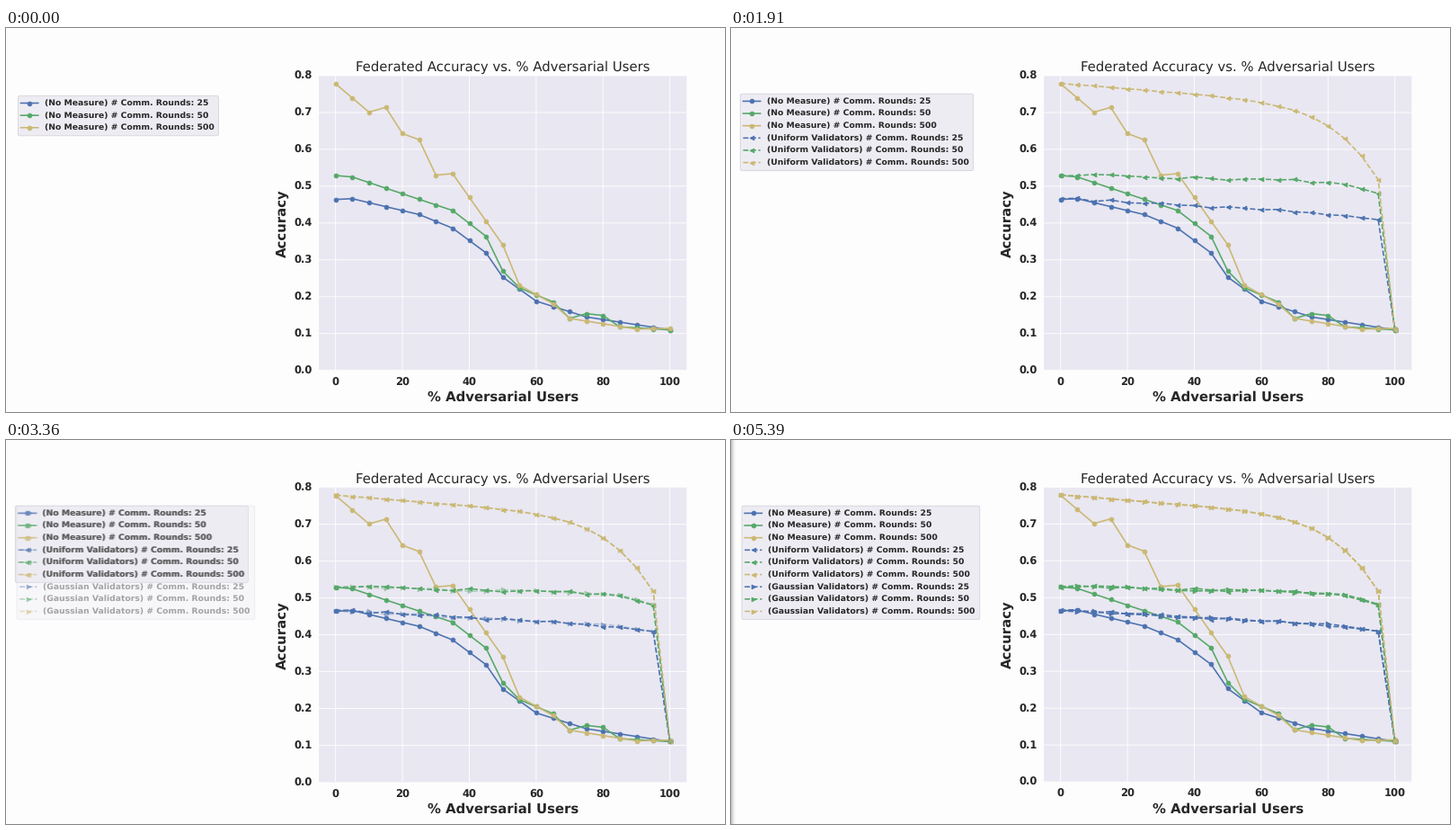
Animation of 800x427 px, one loop 5450 ms. Source, as a matplotlib script:

```python
import numpy as np
import matplotlib.pyplot as plt
from matplotlib.animation import FuncAnimation
from matplotlib.lines import Line2D
from matplotlib.patches import FancyBboxPatch, Rectangle

plt.rcParams["text.hinting"] = "none"
plt.rcParams["path.snap"] = False

W, H, DPI = 800, 427, 64
PT = 72 / DPI  # points per pixel
LOOP_MS, STEP_MS = 5450, 25
FADE_MS = 610
EDGE_SHADOW_MS = 5325
DRIFT = 0.6  # pixels the chart rises during the last fade

PAGE, PANEL, INK = "#fefdfe", "#e9e7f1", "#262626"
COLORS = ["#4c72b0", "#55a868", "#cab873"]
ROUNDS = [25, 50, 500]
USERS = np.arange(0, 101, 5)
CHANCE = 0.11


def through(*points):
    """Straight segments through (users, accuracy) key points."""
    return np.interp(USERS, *zip(*points))


def robust(start, slope, dive, power, jitter, rng):
    """A slow decline that steepens, then falls to chance at 100 %."""
    u = USERS / 95
    curve = start - slope * u - dive * u ** power
    curve += jitter * rng.uniform(-1, 1, len(u))
    curve[-1] = CHANCE
    return curve


def robust_set(seed):
    rng = np.random.default_rng(seed)
    return [robust(.466, .045, .010, 7, .004, rng),
            robust(.530, .020, .031, 14, .004, rng),
            robust(.779, .070, .190, 7, .001, rng)]


NO_MEASURE = [
    through((0, .464), (5, .466), (25, .423), (35, .386), (45, .319),
            (50, .253), (60, .188), (75, .145), (100, CHANCE)),
    through((0, .529), (5, .525), (35, .434), (45, .364), (50, .270), (55, .224),
            (65, .186), (70, .141), (75, .154), (80, .149), (85, .118), (100, CHANCE)),
    through((0, .778), (10, .701), (15, .714), (20, .643), (25, .626), (30, .530),
            (35, .534), (50, .341), (55, .231), (65, .181), (70, .141),
            (90, .112), (100, .114)),
]

# name, curves, marker, line style, legend corner, fade start
GROUPS = [
    ("No Measure", NO_MEASURE, "o", "-", (13.3, 75.3), None),
    ("Uniform Validators", robust_set(1), "<", "--", (10.3, 73.2), 1285),
    ("Gaussian Validators", robust_set(2), ">", "--", (12.0, 73.2), 3105),
]

fig = plt.figure(figsize=(W / DPI, H / DPI), dpi=DPI, facecolor=PAGE)

LEFT, TOP, RIGHT, BOTTOM = 348.1, 53.0, 757.3, 380.7
ax = fig.add_axes([0, 0, 1, 1], facecolor=PANEL)
ax.set(xlim=(-5, 105), ylim=(0, .8), xticks=range(0, 101, 20),
       yticks=np.arange(9) / 10)
ax.grid(color="white", linewidth=0.9 * PT)
ax.set_axisbelow(True)
ax.tick_params(length=0, labelbottom=False, labelleft=False)
for spine in ax.spines.values():
    spine.set_visible(False)


def pixel_layer():
    layer = fig.add_axes([0, 0, 1, 1], label=f"layer {len(fig.axes)}")
    layer.set(xlim=(0, W), ylim=(H, 0))
    layer.axis("off")
    return layer


chart_text, page = pixel_layer(), pixel_layer()


def place_chart(rise):
    ax.set_position([LEFT / W, 1 - (BOTTOM - rise) / H,
                     (RIGHT - LEFT) / W, (BOTTOM - TOP) / H])
    chart_text.set_ylim(H + rise, rise)


def write(layer, x, y, text, size, weight="bold", ha="center", **kw):
    return layer.text(x, y, text, fontsize=size * PT, weight=weight, ha=ha,
                      va="baseline", color=INK, family="DejaVu Sans", **kw)


def make_line(x, y, color, marker, style, **kw):
    return Line2D(x, y, color=color, marker=marker, linestyle=style,
                  linewidth=1.6 * PT, markersize=4.8 * PT,
                  markeredgewidth=0.8 * PT, **kw)


def make_legend(index):
    """Box and rows for every group up to the given one."""
    left, top = GROUPS[index][4]
    row_height = 13.64
    z = 10 * (index + 1)
    handles, labels = [], []
    for name, _, marker, style, *_ in GROUPS[:index + 1]:
        for color, rounds in zip(COLORS, ROUNDS):
            y = top + 8.2 + row_height * len(labels)
            x = left + np.array([3.2, 12.8, 22.4])
            handle = make_line(x, [y] * 3, color, marker, style,
                               markevery=[1], zorder=z + 1)
            handles.append(page.add_line(handle))
            labels.append(write(page, left + 29.3, y + 3.2,
                                f"({name}) # Comm. Rounds: {rounds}", 9.28,
                                ha="left", zorder=z + 2))
    width = 34.3 + max(label.get_window_extent().width for label in labels)
    height = 3.6 + row_height * len(labels)
    box = FancyBboxPatch((left + 2, top + 2), width - 4, height - 4,
                         boxstyle="round,pad=2,rounding_size=2", facecolor="#eeecf3",
                         edgecolor="#d3d1d8", linewidth=0.8 * PT, zorder=z)
    return [page.add_patch(box)] + handles + labels


CENTER = (LEFT + RIGHT) / 2
write(chart_text, CENTER, 48, "Federated Accuracy vs. % Adversarial Users", 14.86, "normal")
write(chart_text, CENTER, 415, "% Adversarial Users", 14.86)
write(chart_text, 312.8, 217, "Accuracy", 14.86, rotation=90, rotation_mode="anchor")
for users in range(0, 101, 20):
    write(chart_text, LEFT + (RIGHT - LEFT) * (users + 5) / 110, 397.7, str(users), 11.56)
for i in range(9):
    write(chart_text, 340.4, BOTTOM - (BOTTOM - TOP) * i / 8 + 4.2, f"{i / 10:.1f}",
          11.56, ha="right")

legends = [make_legend(i) for i in range(len(GROUPS))]
curves = [[ax.add_line(make_line(USERS, values, color, marker, style, zorder=3 + k))
           for color, values in zip(COLORS, series)]
          for k, (_, series, marker, style, *_) in enumerate(GROUPS)]

shadow = [page.add_patch(Rectangle((x, 0), 1, H, facecolor="#77777c", linewidth=0,
                                   alpha=0.42 * (1 - x / 5) ** 1.5, zorder=50))
          for x in range(5)]


def opacity(start, t):
    return 1.0 if start is None else float(np.clip((t - start) / FADE_MS, 0, 1))


def update(frame):
    t = frame * STEP_MS
    levels = [opacity(group[-1], t) for group in GROUPS]
    for k, level in enumerate(levels):
        replaced = k + 1 < len(levels) and levels[k + 1] == 1
        for artist in curves[k] + legends[k]:
            artist.set_alpha(level)
        for artist in curves[k]:
            artist.set_visible(level > 0)
        for artist in legends[k]:
            artist.set_visible(level > 0 and not replaced)
    place_chart(DRIFT * levels[-1])
    for strip in shadow:
        strip.set_visible(t >= EDGE_SHADOW_MS)
    return []


anim = FuncAnimation(fig, update, frames=LOOP_MS // STEP_MS, interval=STEP_MS,
                     repeat=True, repeat_delay=0, blit=False)
plt.show()
```
